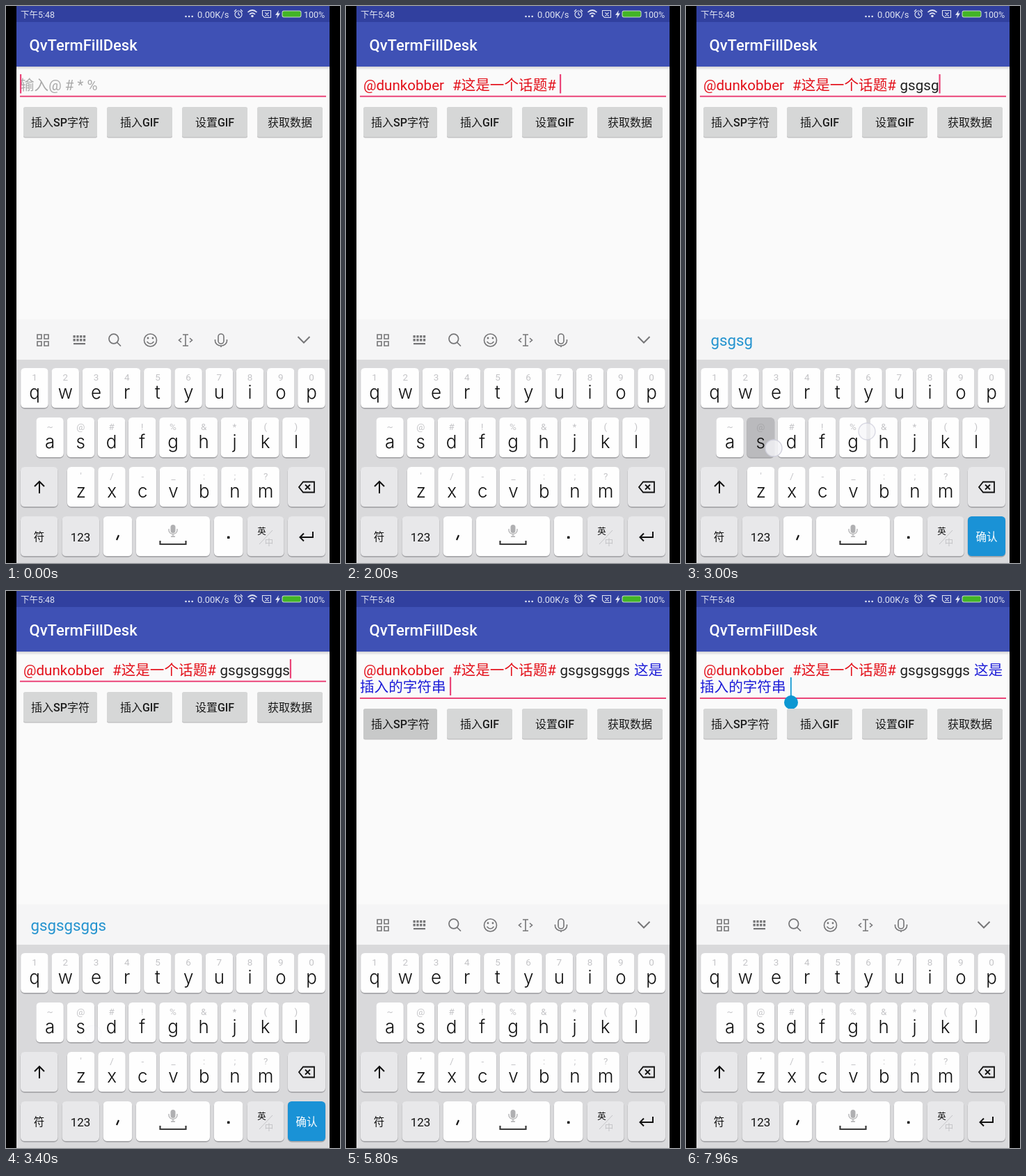
These frames come from a looping animation (480x800 px, 8 s). An HTML page with a canvas:

```html
<!DOCTYPE html>
<html lang="zh">
<head>
<meta charset="utf-8">
<style>
html, body { margin: 0; width: 100%; height: 100%; overflow: hidden; background: #000; }
canvas { display: block; width: 480px; height: 800px; }
</style>
</head>
<body>
<canvas id="stage" width="480" height="800"></canvas>
<script>
const ctx = document.getElementById('stage').getContext('2d');
const LOOP = 8000;
const FONT = 'Roboto, "Noto Sans CJK SC", "Noto Sans CJK", sans-serif';
const KEY_FONT = 'Inter, Roboto, sans-serif';
const PAGE = '#fafafa', BOARD = '#d9d9db', SOFT = '#e8e8ea', ICON = '#757577';
const RED = '#e3101a', PINK = '#ea4478', TEAL = '#0c97d2', BLUE = '#1c1cd8';

// Touches: start, end, key, x, y, vertical travel
const touches = [
  [620, 860, 's', 108, 630, -36],
  [1500, 1780, 'd', 152, 630, -36],
  [2300, 2390, 'g', 258, 614, 0],
  [2430, 2520, 's', 124, 634, 0],
  [2570, 2660, 'g', 259, 612, 0],
  [2720, 2820, 's', 125, 634, 0],
  [2870, 2980, 'g', 260, 611, 0],
  [2960, 3060, 's', 126, 635, 0],
  [3070, 3140, 'g', 258, 613, 0],
  [3160, 3230, 'g', 258, 613, 0],
  [3220, 3300, 's', 125, 636, 0],
  [5330, 5600, 'button', 84, 170, 0],
  [6160, 6480, '', 257, 128, 0]
];
const typing = touches.filter(p => p[0] > 2200 && p[1] < 3500);
const MENTION_AT = 860, TOPIC_AT = 1780, INSERT_AT = 5600, HANDLE_AT = 6480;
// The caret blinks off 500 ms after each edit
const caretOn = [
  [0, 80], [600, 1360], [TOPIC_AT, 2280], [2390, 3800],
  [4280, 4800], [5280, 6100], [HANDLE_AT, 7000], [7440, 7960]
];

function box(x, y, w, h, r, fill) {
  ctx.beginPath();
  ctx.roundRect(x, y, w, h, r);
  ctx.fillStyle = fill;
  ctx.fill();
}

function text(s, x, y, size, fill, align = 'left', weight = 400, font = FONT) {
  ctx.font = `${weight} ${size}px ${font}`;
  ctx.textAlign = align;
  ctx.fillStyle = fill;
  ctx.fillText(s, x, y);
}

function stroke(d, color, width = 1.6, x = 0, y = 0) {
  ctx.save();
  ctx.translate(x, y);
  ctx.strokeStyle = color;
  ctx.lineWidth = width;
  ctx.stroke(new Path2D(d));
  ctx.restore();
}

function disc(x, y, r, fill) {
  ctx.beginPath();
  ctx.arc(x, y, r, 0, 7);
  ctx.fillStyle = fill;
  ctx.fill();
}

function statusBar() {
  const c = '#dfe3f2';
  box(15, 0, 450, 23, 0, '#31409f');
  text('下午5:48', 21, 16.5, 12.5, c);
  for (let i = 0; i < 3; i++) disc(258.5 + i * 4.6, 15, 1.3, c);
  text('0.00K/s', 275, 16.5, 13, c);
  stroke('M-5 1a5 5 0 1 0 10 0a5 5 0 1 0 -10 0M0 -2V1L2 2.5M-6 -3L-3 -6M6 -3L3 -6', c, 1.2, 334, 11);
  stroke('M-6.5 -2Q0 -8 6.5 -2M-4 1Q0 -3 4 1', c, 1.7, 354, 11);
  disc(354, 14.5, 1.8, c);
  stroke('M-6 -5H6V5H-3L-6 2ZM-2 -2L3 3M3 -2L-2 3', c, 1.1, 374.5, 11.5);
  ctx.fillStyle = c;
  ctx.fill(new Path2D('M392 6L387 13H390L389 18L394 10.5H391Z'));
  box(396.5, 6.5, 28, 10, 3, '#c6d8cc');
  box(397.5, 7.5, 26, 8, 2, '#43b526');
  text('100%', 428, 16.5, 12.5, c);
}

function appBar() {
  box(15, 23, 450, 64, 0, '#3f51b5');
  const g = ctx.createLinearGradient(0, 87, 0, 92);
  g.addColorStop(0, '#d2d2d4');
  g.addColorStop(1, PAGE);
  box(15, 87, 450, 5, 0, g);
  text('QvTermFillDesk', 33.5, 64, 22, '#fff', 'left', 500);
}

function editor(t, typed) {
  const inserted = t >= INSERT_AT, base = 120.5, size = 20.6;
  if (t < MENTION_AT) text('输入@ # * %', 20, base, size, '#a9a9a9');
  else text('@dunkobber', 25, base, size, RED);
  if (t >= TOPIC_AT) text('#这是一个话题#', 153, base, size, RED);
  text(typed, 307.5, base, size, '#212121');
  const typedEnd = 307.5 + ctx.measureText(typed).width;
  if (inserted) {
    text('这是', 414, base, size, BLUE);
    text('插入的字符串', 20, base + 24, size, BLUE);
  }
  box(20, inserted ? 153 : 128.7, 440, 2, 0, PINK);

  if (t >= HANDLE_AT) {
    box(150, 124, 1.7, 28, 0, TEAL);
    disc(151, 160, 10, TEAL);
    ctx.fill(new Path2D('M151 149L157 155H145Z'));
  }
  if (caretOn.some(([a, b]) => t >= a && t < b)) {
    let x = 20;
    if (inserted) x = 149;
    else if (typed) x = typedEnd;
    else if (t >= TOPIC_AT) x = 307;
    else if (t >= MENTION_AT) x = 146;
    box(x, inserted ? 123.5 : 98, 2.2, inserted ? 26.5 : 27.5, 0, PINK);
  }
}

function buttons(t) {
  const y = t >= INSERT_AT ? 169 : 145;
  [[25, 106, '插入SP字符'], [145, 94, '插入GIF'], [253, 94, '设置GIF'], [361, 94, '获取数据']].forEach(([x, w, s], i) => {
    box(x, y + 1, w, 43.5, 2.5, '#c3c3c4');
    box(x, y, w, 43, 2.5, '#d6d7d7');
    if (i === 0 && t > 5330 && t < 6080) {
      const grow = Math.min(1, (t - 5330) / 300);
      const fade = Math.min(1, (6080 - t) / 480);
      ctx.save();
      ctx.beginPath();
      ctx.roundRect(x, y, w, 43, 2.5);
      ctx.clip();
      disc(x + w / 2, y + 21, 10 + 52 * grow, `rgba(70,70,74,${0.17 * fade})`);
      ctx.restore();
    }
    text(s, x + w / 2, y + 28, 16, '#1b1b1b', 'center', 500);
  });
}

function toolbar(typed) {
  box(15, 450, 450, 58, 0, '#f5f5f6');
  if (typed) return text(typed, 35.5, 488, 22.3, '#2493cf');
  const icon = (d, x, w) => stroke(d, ICON, w, x, 480);
  icon('M-8 -8H-2V-2H-8ZM2 -8H8V-2H2ZM-8 2H-2V8H-8ZM2 2H8V8H2Z', 53, 1.6);
  for (let i = 0; i < 8; i++) box(96.5 + i % 4 * 4.8, 473 + (i >> 2) * 5, 3.3, 3.5, 0.5, ICON);
  box(97, 484, 17, 2.2, 0, ICON);
  icon('M-8 -2a6.8 6.8 0 1 0 13.6 0a6.8 6.8 0 1 0 -13.6 0M3.5 3L9 8.5', 156, 1.7);
  icon('M-9 0a9 9 0 1 0 18 0a9 9 0 1 0 -18 0M-5 2Q0 8 5 2', 207.5, 1.6);
  disc(204, 477, 1.4, ICON);
  disc(211, 477, 1.4, ICON);
  icon('M-4 -8H4M0 -8V8M-4 8H4M-6 -3L-9.5 0L-6 3M6 -3L9.5 0L6 3', 258, 1.6);
  icon('M-4 -5a4 4 0 0 1 8 0V1a4 4 0 0 1 -8 0ZM-8.5 -1V1a8.5 7 0 0 0 17 0V-1M0 8V10', 309, 1.6);
  icon('M-8.5 -5L0 3.5L8.5 -5', 428, 2);
}

function key(x, y, w, fill = '#fefefe') {
  box(x - 0.3, y + 0.5, w + 0.6, 58.3, 6, '#a6a6a9');
  box(x, y, w, 57, 5.5, fill);
}

function letterRow(letters, hints, x0, y, pressed) {
  [...letters].forEach((c, i) => {
    const x = x0 + i * 44.23, mid = x + 19.8, down = pressed.includes(c);
    key(x, y, 39.5, down ? '#bababd' : undefined);
    text(hints[i], mid, y + 17.5, 13.5, down ? '#a6a6a9' : '#c4c4c7', 'center');
    text(c, mid, y + 43.5, 26, '#101010', 'center', 300, KEY_FONT);
  });
}

function keyboard(t, typed) {
  const pressed = touches.filter(p => t >= p[0] && t < p[1]).map(p => p[2]);
  box(15, 508, 450, 292, 0, BOARD);
  letterRow('qwertyuiop', '1234567890', 21.2, 520, pressed);
  letterRow('asdfghjkl', '~@#!%&*()', 43.3, 591, pressed);
  letterRow('zxcvbnm', "'/-_:;?", 88, 662, pressed);

  key(21, 662, 53.5, SOFT);
  stroke('M0 9V-8M-7 -1L0 -8L7 -1', '#111', 2, 48, 691);
  key(405, 662, 54, SOFT);
  stroke('M-11 0L-5 -7.5H11V7.5H-5ZM-2 -3.5L5 3.5M5 -3.5L-2 3.5', '#111', 1.8, 432, 691);

  key(21, 733, 53.5, SOFT);
  text('符', 47.5, 767.5, 15.5, '#111', 'center');
  key(80.5, 733, 53.5, SOFT);
  text('123', 107, 768.5, 17, '#111', 'center');
  key(139.7, 733, 41.5);
  stroke('M1.5 -3L-1.5 4', '#111', 2.2, 160.5, 763);
  key(187, 733, 106);
  box(236.5, 745, 7, 12, 3.5, '#b0b0b2');
  stroke('M-6 -2V0a6 5.5 0 0 0 12 0V-2M0 5.5V9M-3 9H3', '#b0b0b2', 1.3, 240, 753);
  stroke('M-18.5 -5V0H18.5V-5', '#3a3a3a', 2.2, 240, 773);
  key(299, 733, 41.5);
  box(318, 761.5, 3.5, 3.5, 0.5, '#111');
  key(346.5, 733, 53, SOFT);
  text('英', 367.5, 758.5, 12.5, '#111', 'center');
  text('中', 378, 775, 12.5, '#c4c4c7', 'center');
  stroke('M364 773L383 753', '#c4c4c7', 1);

  key(405, 733, 54, typed ? '#1a92d6' : SOFT);
  if (typed) text('确认', 432, 767.5, 15.5, '#fff', 'center');
  else stroke('M9 -6V2H-9M-4 -3.5L-9.5 2L-4 7.5', '#111', 2, 432, 761);
}

function drawTouches(t) {
  for (const [a, b, , x, y, travel] of touches) {
    if (t < a || t > b + 110) continue;
    const p = Math.min(1, (t - a) / (b - a));
    ctx.save();
    ctx.globalAlpha = t < b ? 1 : 1 - (t - b) / 110;
    disc(x, y + travel * p * p * (3 - 2 * p), 12, 'rgba(244,244,248,.8)');
    ctx.strokeStyle = '#d0d0dc';
    ctx.lineWidth = 1.3;
    ctx.stroke();
    ctx.restore();
  }
}

function draw(now) {
  const t = now % LOOP;
  const typed = typing.filter(p => t >= p[1]).map(p => p[2]).join('');
  const composing = t < INSERT_AT ? typed : '';
  box(0, 0, 480, 800, 0, '#000');
  box(15, 0, 450, 800, 0, PAGE);
  statusBar();
  appBar();
  editor(t, typed);
  buttons(t);
  toolbar(composing);
  keyboard(t, composing);
  drawTouches(t);
}

const start = performance.now();
function loop() {
  draw(performance.now() - start);
  requestAnimationFrame(loop);
}
loop();
</script>
</body>
</html>
```
